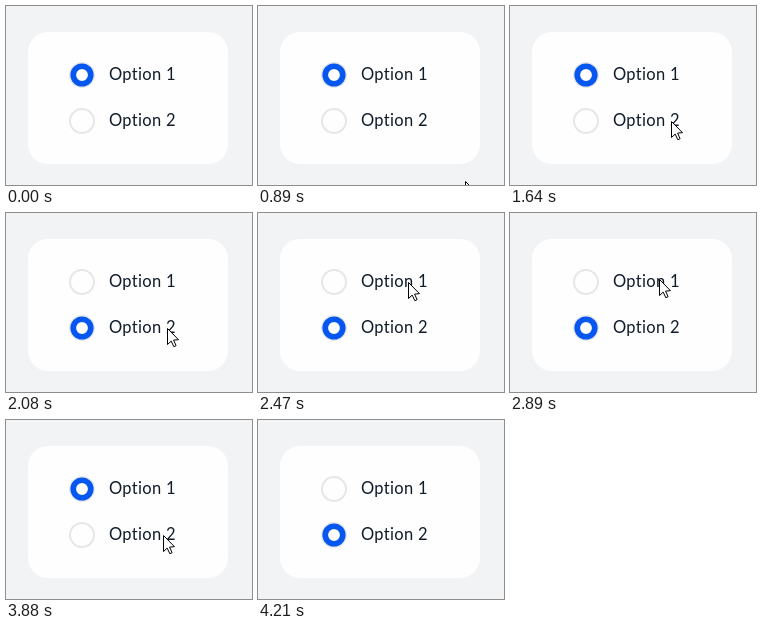
An HTML page with a canvas that plays this animation: 246x179 px, repeating every 6110 ms.

```html
<!DOCTYPE html>
<html lang="en">
<head>
<meta charset="utf-8">
<title>Radio options</title>
<style>
  html, body { margin: 0; width: 100%; height: 100%; overflow: hidden; background: #f1f3f5; }
  canvas { display: block; width: 246px; height: 179px; }
</style>
</head>
<body>
<canvas id="stage"></canvas>
<script>
const W = 246, H = 179, LOOP = 6110;
const FADE = 320, CLICKS = [1720, 2910, 3870];
const ENTER = 850, LEAVE = 4205;
const BLUE = '#0557f0', INK = '#111c2b';

const canvas = document.getElementById('stage');
const ctx = canvas.getContext('2d');
const dpr = window.devicePixelRatio || 1;
canvas.width = W * dpr;
canvas.height = H * dpr;

// The pointer rests between moves
const entry = { x: 209, y: 178 };
const moves = [
  { from: 840, to: 1250, x: 180, y: 136 },
  { from: 1380, to: 1640, x: 162, y: 116 },
  { from: 2210, to: 2520, x: 150, y: 67 },
  { from: 2930, to: 3020, x: 151, y: 52 },
  { from: 3020, to: 3220, x: 157, y: 101 },
  { from: 3310, to: 3550, x: 158, y: 116 },
  { from: 3870, to: 4200, x: 187, y: 178 }
];
const arrow = new Path2D('M0 0V16L3.7 12.6L6.3 18.2L8.6 17.2L6.1 11.6L11 11.2Z');

// Eased progress of t between two times
function progress(t, from, to) {
  const p = Math.max(0, Math.min(1, (t - from) / (to - from)));
  return p * p * (3 - 2 * p);
}

function pointerAt(t) {
  let { x, y } = entry;
  for (const m of moves) {
    const p = progress(t, m.from, m.to);
    x += (m.x - x) * p;
    y += (m.y - y) * p;
  }
  return [Math.round(x), Math.round(y)];
}

// 0 = first option, 1 = second option
function selectionAt(t) {
  return CLICKS.reduce((s, c, i) => s + (-1) ** i * progress(t, c, c + FADE), 0);
}

function ring(y, radius, width, color) {
  ctx.strokeStyle = color;
  ctx.lineWidth = width;
  ctx.beginPath();
  ctx.arc(76, y, radius - width / 2, 0, Math.PI * 2);
  ctx.stroke();
}

function option(y, label, on) {
  ring(y, 13, 2, '#e5e6e8');
  if (on > 0) {
    ctx.globalAlpha = Math.min(1, on * 1.5);
    ring(y, 11.6, 5.7 * on, BLUE);
    ctx.globalAlpha = 1;
  }
  ctx.fillStyle = INK;
  ctx.fillText(label, 103, y + 5);
}

function pointer(x, y) {
  ctx.save();
  ctx.translate(x - 0.5, y - 0.5);
  ctx.fillStyle = '#fff';
  ctx.fill(arrow);
  ctx.strokeStyle = '#000';
  ctx.lineWidth = 1;
  ctx.stroke(arrow);
  ctx.restore();
}

function draw(t) {
  ctx.setTransform(dpr, 0, 0, dpr, 0, 0);
  ctx.fillStyle = '#f1f3f5';
  ctx.fillRect(0, 0, W, H);
  ctx.fillStyle = '#fefefe';
  ctx.beginPath();
  ctx.roundRect(22, 26, 200, 132, 20);
  ctx.fill();

  ctx.font = '16.5px Lato, "Open Sans", sans-serif';
  ctx.letterSpacing = '0.3px';
  const second = selectionAt(t);
  option(69, 'Option 1', 1 - second);
  option(115, 'Option 2', second);

  if (t >= ENTER && t < LEAVE) pointer(...pointerAt(t));
}

const start = performance.now();
function frame() {
  draw((performance.now() - start) % LOOP);
  requestAnimationFrame(frame);
}
frame();
</script>
</body>
</html>
```
